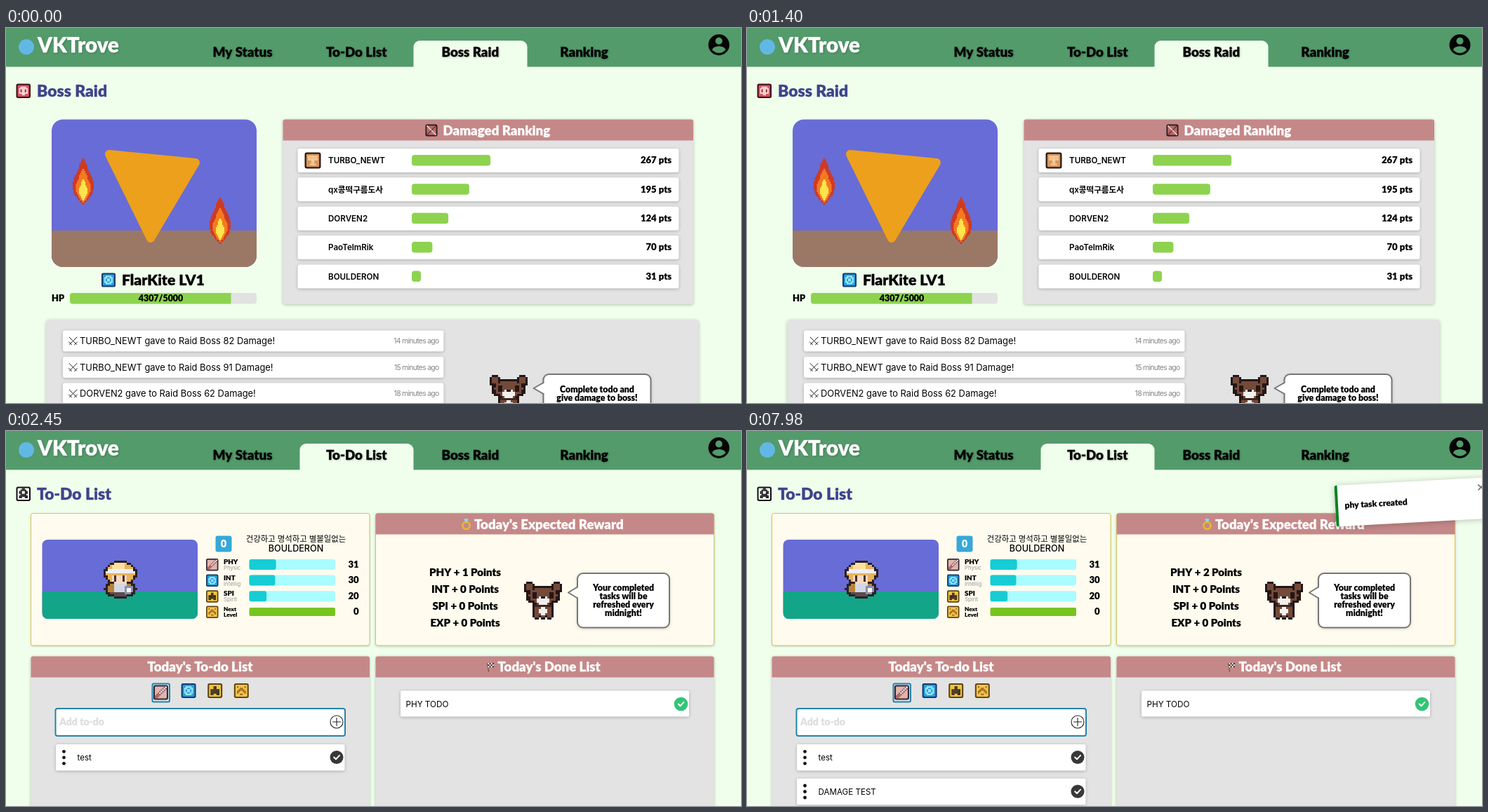
An HTML page with a canvas that plays this animation: 1047 by 535 pixels, repeating every 8 s.

```html
<!DOCTYPE html>
<html lang="en">
<head>
<meta charset="utf-8">
<title>Quest board</title>
<style>
html, body { margin: 0; width: 100%; height: 100%; overflow: hidden; background: #f0ffec; }
canvas { display: block; width: 1047px; height: 535px; }
</style>
</head>
<body>
<canvas id="stage"></canvas>
<script>
const W = 1047, H = 535, LOOP = 8000, STEP = 70;
const canvas = document.getElementById('stage');
const ctx = canvas.getContext('2d');
const dpr = window.devicePixelRatio || 1;
canvas.width = W * dpr;
canvas.height = H * dpr;

const HEAD = '#539b6b', PAGE = '#f0ffec', ROSE = '#c58888', PANEL = '#e3e3e3';
const TITLE = '#3d448c', LIME = '#8dd34f', SKY = '#686cd6', FOCUS = '#2583a8';
const CREAM = '#fffcef', GOLD = '#d9c35c', DARK = '#241617';
const HERO_NAME = 'BOULDERON';

const HOVER = 1680, OPEN_TODO = 2030, UNHOVER = 2450, CARET_ON = 3640, CARET_OFF = 7210, SUBMIT = 7770;
// One key per time; '<' deletes
const KEYS = 'DAMAG<GE TEST';
const KEY_TIMES = [4200, 4410, 4550, 4690, 5040, 5460, 5530, 5670, 5880, 6230, 6300, 6510, 6650];

const { abs, hypot, sin, cos, PI } = Math;
const clamp = (v, a = 0, b = 1) => Math.min(b, Math.max(a, v));
const mix = (a, b, k) => a + (b - a) * k;

function typedText(t) {
  if (t >= SUBMIT) return '';
  return KEY_TIMES.filter(at => at <= t)
    .reduce((s, _, i) => KEYS[i] === '<' ? s.slice(0, -1) : s + KEYS[i], '');
}

function box(x, y, w, h, r, fill, shadow, border, bw = 1) {
  ctx.save();
  ctx.beginPath();
  ctx.roundRect(x, y, w, h, r);
  if (shadow) {
    ctx.shadowColor = 'rgba(0,0,0,.25)';
    ctx.shadowBlur = shadow * dpr;
    ctx.shadowOffsetY = dpr;
  }
  ctx.fillStyle = fill;
  ctx.fill();
  ctx.shadowColor = 'transparent';
  if (border) {
    ctx.strokeStyle = border;
    ctx.lineWidth = bw;
    ctx.stroke();
  }
  ctx.restore();
}

function disc(x, y, r, fill, stroke, lw = 1) {
  ctx.beginPath();
  ctx.arc(x, y, r, 0, PI * 2);
  if (fill) { ctx.fillStyle = fill; ctx.fill(); }
  if (stroke) { ctx.strokeStyle = stroke; ctx.lineWidth = lw; ctx.stroke(); }
}

function line(points, color, lw) {
  ctx.beginPath();
  points.forEach(([x, y]) => ctx.lineTo(x, y));
  ctx.strokeStyle = color;
  ctx.lineWidth = lw;
  ctx.lineCap = ctx.lineJoin = 'round';
  ctx.stroke();
}

// Heavy rounded display text
function loud(s, x, y, size, color = '#000', align = 'left', shadow = false) {
  ctx.save();
  ctx.font = `900 ${size}px Lato, sans-serif`;
  ctx.textAlign = align;
  ctx.fillStyle = ctx.strokeStyle = color;
  ctx.lineWidth = size * 0.015;
  ctx.lineJoin = 'round';
  ctx.strokeText(s, x, y);
  if (shadow) {
    ctx.shadowColor = 'rgba(0,0,0,.25)';
    ctx.shadowBlur = 3 * dpr;
    ctx.shadowOffsetX = ctx.shadowOffsetY = dpr;
  }
  ctx.fillText(s, x, y);
  ctx.restore();
}

function plain(s, x, y, size, color = '#000', align = 'left', weight = 400, spacing = 0) {
  ctx.font = `${weight} ${size}px Inter, "Noto Sans CJK KR", "Noto Sans CJK", sans-serif`;
  ctx.textAlign = align;
  ctx.fillStyle = color;
  ctx.letterSpacing = spacing + 'px';
  ctx.fillText(s, x, y);
  ctx.letterSpacing = '0px';
}

// Pixel art from a rule: colorAt(u, v) with u and v counted from the middle
function pixels(x, y, cell, n, colorAt) {
  const mid = (n - 1) / 2;
  for (let j = 0; j < n; j++) {
    for (let i = 0; i < n; i++) {
      const color = colorAt(i - mid, j - mid);
      if (!color) continue;
      ctx.fillStyle = color;
      ctx.fillRect(x + i * cell, y + j * cell, cell, cell);
    }
  }
}

// kind: [edge, fill, glyph rule on an 8 by 8 grid]
const ICONS = {
  phy: ['#352636', '#e2b5aa', (u, v) => abs(u + v) < 1 ? (u > -1 ? '#f8f6fa' : '#c4544c') : abs(u + v) < 2 && '#8c5a66'],
  int: ['#153c6c', '#279ddc', (u, v) => (abs(hypot(u, v) - 2.7) < 0.6 || hypot(u, v) < 1) && '#a5effc'],
  spi: ['#5c430f', '#f1c443', (u, v) => (hypot(u, v + 2) < 1.4 || abs(u) < 3 && abs(v - 0.5) < 1.1
    || v > 1 && v < 3 && abs(abs(u) - 2) < 1) && '#28221c'],
  exp: ['#654711', '#f3c44e', (u, v) => abs(u) < 3 && abs(v) < 3 && (v - abs(u) + 10) % 4 < 2 && '#9c6418'],
  skull: ['#381019', '#d9535e', (u, v) => hypot(u, v + 0.3) < 3.1
    && (abs(abs(u) - 1.5) < 0.6 && abs(v) < 1 ? '#8c2f3a' : '#ffe9e4')],
  hit: ['#201a1e', '#b8686a', (u, v) => abs(u - v) < 1 ? '#f5eeee' : abs(u + v) < 1 && '#58282c'],
  cup: ['#2c1912', '#d8965f', (u, v) => abs(v) < 3 && abs(u) < (v < 0 ? 3 : v < 2 ? 1 : 2) && '#f6cb95'],
  medal: ['#111', '#fff', (u, v) => (abs(hypot(u, v + 1) - 2) < 0.7 || v > 1 && v < 3 && abs(abs(u) - 2) < 1) && '#111'],
};

function icon(kind, x, y, size) {
  const [edge, fill, glyph] = ICONS[kind];
  const c = size / 10;
  box(x, y, size, size, c * 1.3, edge);
  box(x + c, y + c, size - 2 * c, size - 2 * c, c * 0.5, fill);
  pixels(x + c, y + c, c, 8, glyph);
}

function bear(x, y) {
  pixels(x, y, 3, 18, (u, v) => {
    u = abs(u);
    const ear = hypot(u - 6.5, v + 6.3) - 2.7, head = hypot(u * 0.6, v + 2.5) - 5;
    const body = hypot(u * 0.9, v - 4) - 4.6, foot = hypot(u - 3, v - 7.2) - 1.9;
    const depth = Math.min(ear, head, body, foot);
    if (depth > 0) return null;
    if (depth > -1) return DARK;
    if (hypot(u - 4, v + 2.5) < 1.3 || u < 1 && v === -1.5) return DARK;
    if (hypot(u * 0.7, v) < 2 || hypot(u, v - 5) < 2) return '#f2f0ec';
    return abs(v - 2.5) < 0.6 ? '#3c2620' : '#744a39';
  });
}

function hero(x, y) {
  pixels(x, y, 3, 18, (u, v) => {
    const head = hypot(u * 0.75, v + 3) - 6, body = hypot(u * 0.6, v - 4.5) - 4.5;
    const depth = Math.min(head, body);
    if (depth > 0) return null;
    if (depth > -1) return '#2a2024';
    if (hypot(u - 4, v - 5) < 2.4) return hypot(u - 4, v - 5) < 1.5 ? '#f5f6fb' : '#8a92a8';
    if (v > 2) return v > 6 ? '#5c4a4c' : abs(u) < 3 ? '#d4d8e4' : '#b98338';
    if (v > -2 && abs(u + 0.5) < 4) return abs(abs(u + 0.5) - 2) < 0.6 && v < 1 ? '#4b2d2a' : '#f8dac0';
    if (abs(v + 4) < 1) return '#eceef6';
    return v < -5 && abs(u + 1) < 3 ? '#ffdf9c' : '#e9b25c';
  });
}

// Three nested tapered layers: rim, flame, core
function flame(cx, top) {
  ['#cf3a22', '#f37a20', '#ffe44c'].forEach((color, k) => {
    const rows = 23 - 6 * k, width = 15 - 4.5 * k;
    ctx.fillStyle = color;
    for (let row = 0; row < rows; row++) {
      const v = (row + 0.5) / rows;
      const half = Math.round(width * sin(PI * v ** 1.4) ** 0.9 / 1.5) * 1.5;
      ctx.fillRect(cx - half, top + (22 - k - rows + 1 + row) * 3, half * 2, 3);
    }
  });
}

function scene(x, y, w, h, r, horizon, ground) {
  box(x, y, w, h, r, SKY);
  ctx.save();
  ctx.beginPath();
  ctx.roundRect(x, y, w, h, r);
  ctx.clip();
  ctx.fillStyle = ground;
  ctx.fillRect(x, horizon, w, h);
  ctx.restore();
}

function boss(t) {
  const tick = Math.floor(t / STEP) * STEP;
  const spread = (1 + cos(tick / 350 * PI * 2)) / 2;
  ctx.beginPath();
  ctx.moveTo(147, 180);
  ctx.lineTo(mix(255, 270, spread), 192);
  ctx.lineTo(mix(199, 206, spread), mix(306, 300, spread));
  ctx.closePath();
  ctx.fillStyle = ctx.strokeStyle = '#eda01c';
  ctx.lineWidth = 12;
  ctx.lineJoin = 'round';
  ctx.fill();
  ctx.stroke();
}

function bubble(x, y, w, h, tailX, tailY, lines, textX, textY) {
  box(x, y, w, h, 8, '#fff', 5, '#777', 2);
  const tail = [[x, tailY - 8], [tailX, tailY], [x, tailY + 8]];
  ctx.beginPath();
  tail.forEach(([a, b]) => ctx.lineTo(a + 2, b));
  ctx.fillStyle = '#fff';
  ctx.fill();
  line(tail, '#777', 2);
  lines.forEach((s, i) => loud(s, textX, textY + i * 12, 12.3, '#000', 'center'));
}

function titledPanel(x, y, w, h, fill, border) {
  box(x, y, w, h, 3, fill, 4, border);
  box(x, y, w, 30, [3, 3, 0, 0], ROSE);
}

function pageTitle(kind, s) {
  icon(kind, 14.5, 79.5, 20.5);
  loud(s, 44, 98, 22.9, TITLE);
}

function header(t, active) {
  ctx.fillStyle = HEAD;
  ctx.fillRect(0, 0, W, 55.4);
  disc(29, 27, 11, '#62b8e4');
  loud('VKTrove', 45, 35, 29.5, '#fff', 'left', true);
  box(418.5 + (active - 1) * 162, 18, 162, 38, [9, 9, 0, 0], PAGE);
  const hover = t < UNHOVER ? clamp((t - HOVER) / 210) : 0;
  ['My Status', 'To-Do List', 'Boss Raid', 'Ranking'].forEach((s, i) => {
    const color = i === 1 ? `rgb(${24 * hover},${62 * hover},${142 * hover})` : '#000';
    loud(s, 337 + i * 162.2, 41, 18.7, color, 'center', true);
  });
  disc(1015.5, 24, 15, '#050505');
  disc(1015.5, 18.5, 5, HEAD);
  ctx.beginPath();
  ctx.ellipse(1015.5, 31.5, 9.5, 5.5, 0, PI, 0);
  ctx.quadraticCurveTo(1015.5, 40, 1006, 31.5);
  ctx.fill();
}

function rankRow(y, name, points) {
  box(415.5, y, 543, 34, 3, '#fff', 4);
  plain(name, 459, y + 21.3, 11.6, '#000', 'left', 600);
  box(578, y + 9, points * 0.42, 15.5, 4, LIME);
  loud(points + ' pts', 948, y + 21.3, 13.1, '#000', 'right');
}

function logRow(y, name, damage, age) {
  box(81, y, 542.5, 30, 3, '#fff', 4);
  for (const d of [-1, 1]) {
    line([[95.5 - 5.5 * d, y + 9.5], [95.5 + 5 * d, y + 20]], '#222', 1);
    line([[95.5 + 2 * d, y + 20.5], [95.5 + 6 * d, y + 16.5]], '#222', 1);
  }
  plain(`${name} gave to Raid Boss ${damage} Damage!`, 105, y + 19.7, 12.9);
  plain(`${age} minutes ago`, 616.5, y + 18.8, 10.4, '#858585', 'right', 400, -0.7);
}

function raidPage(t) {
  pageTitle('skull', 'Boss Raid');
  scene(65, 130.5, 292, 210.5, 16, 289, '#9b7866');
  flame(110, 183);
  flame(305, 239);
  boss(t);

  icon('int', 136, 349.5, 20);
  loud('FlarKite LV1', 165, 367, 21.2);
  loud('HP', 65, 390, 12.8);
  box(91, 378, 266, 15.5, 4, '#e2e2e2');
  box(91, 378, 229.5, 15.5, [4, 0, 0, 4], LIME);
  loud('4307/5000', 220.5, 390, 12.4, '#000', 'center');

  titledPanel(394.5, 130.5, 584.5, 263.5, PANEL);
  icon('hit', 597.5, 137.5, 17);
  loud('Damaged Ranking', 622.5, 152.5, 18.7, '#fff');
  [['TURBO_NEWT', 267], ['qx콩떡구름도사', 195], ['DORVEN2', 124], ['PaoTelmRik', 70], [HERO_NAME, 31]]
    .forEach(([name, points], i) => rankRow(172 + i * 41.35, name, points));
  icon('cup', 425.5, 177.5, 23);

  box(57.5, 416.5, 929, 140, 4, PANEL, 5);
  [['TURBO_NEWT', 82, 14], ['TURBO_NEWT', 91, 15], ['DORVEN2', 62, 18]]
    .forEach((entry, i) => logRow(431.5 + i * 37.5, ...entry));
  bear(689, 495);
  bubble(765.5, 494, 153, 80, 751.5, 514, ['Complete todo and', 'give damage to boss!'], 842, 520);
}

function check(x, y, r, fill) {
  disc(x, y, r, fill);
  line([[x - 3.8, y], [x - 1, y + 2.8], [x + 4, y - 2.6]], '#fff', 2);
}

function task(y, name) {
  box(71, y, 411.5, 37.5, 2, '#fff', 4);
  for (let i = -1; i <= 1; i++) disc(82.5, y + 18.8 + i * 8.5, 2.4, '#111');
  plain(name, 101.5, y + 23, 11.6);
  check(471, y + 18.5, 9.5, '#383838');
}

function ring() {
  disc(655.5, 135, 5, null, '#e6b92e', 2.6);
  line([[654, 126.5], [657, 126.5], [655.5, 128.5], [654, 126.5]], '#8fd6ee', 3);
}

function flag() {
  line([[685.5, 331.5], [687.5, 343]], '#6b4a38', 1.2);
  pixels(686.5, 331, 2.1, 4, (u, v) => v < 1 && ((u + v) % 2 ? '#eee' : '#333'));
}

function statRow(i, kind, label, sub, value) {
  const y = 183 + i * 22.6;
  icon(kind, 285, y - 1, 17.5);
  loud(label, 310, y + 7.2, 9.8);
  plain(sub, 310, y + 15, 7.8, '#999');
  box(346.5, y, 122.5, 15, 3, '#a9fcff');
  box(346.5, y, value * 1.23, 15, 3, '#17ccd5');
  loud(value, 502.5, y + 11.8, 13, '#000', 'right');
}

function statusCard() {
  box(35.5, 117.5, 482.5, 188.5, 3, CREAM, 3, GOLD);
  scene(51.5, 155, 221.5, 113, 8, 229, '#12a588');
  hero(136, 185);
  box(298.5, 149.5, 23, 23, 3, '#36a8d8');
  loud('0', 310, 166, 14, '#fff', 'center');
  plain('건강하고 명석하고 별볼일없는', 413, 158, 11.4, '#000', 'center', 500);
  plain(HERO_NAME, 413, 171.5, 12.6, '#000', 'center', 500);
  statRow(0, 'phy', 'PHY', 'Physic', 31);
  statRow(1, 'int', 'INT', 'Intellig', 30);
  statRow(2, 'spi', 'SPI', 'Spirit', 20);
  icon('exp', 285, 249.5, 17.5);
  loud('Next', 310, 257, 8.2);
  loud('Level', 310, 264.5, 8.2);
  box(346.5, 252, 122.5, 12, 2, '#77c421');
  loud('0', 502.5, 262.3, 13, '#000', 'right');
}

function rewardCard(phy) {
  titledPanel(526.5, 117.5, 482, 188.5, CREAM, GOLD);
  ring();
  loud("Today's Expected Reward", 667, 139.5, 18.6, '#fff');
  ['PHY', 'INT', 'SPI', 'EXP'].forEach((name, i) =>
    loud(`${name} + ${i ? 0 : phy} Points`, 654, 206.7 + i * 24, 15, '#000', 'center'));
  bear(738, 215);
  bubble(814, 203, 131, 77.5, 801, 230.5,
    ['Your completed', 'tasks will be', 'refreshed every', 'midnight!'], 879.5, 228);
}

function field(t) {
  box(70.5, 396, 412.5, 39, 3, '#fff', 0, FOCUS, 2);
  const typed = typedText(t);
  if (typed) loud(typed, 75, 419.8, 13.4);
  else loud('Add to-do', 76, 419.8, 14, '#dedede');
  if (t >= CARET_ON && t < CARET_OFF) {
    ctx.font = '900 13.4px Lato, sans-serif';
    ctx.fillStyle = '#000';
    ctx.fillRect(Math.round(75 + ctx.measureText(typed).width), 406.5, 1, 16.5);
  }
  disc(471, 415, 9, null, '#222', 1.1);
  line([[465.5, 415], [476.5, 415]], '#222', 1.1);
  line([[471, 409.5], [471, 420.5]], '#222', 1.1);
}

function toast(t) {
  const k = clamp((t - SUBMIT) / 210);
  ctx.save();
  ctx.translate(mix(1060, 836.5, sin(k * PI / 2)), 78);
  ctx.rotate(-3.1 * PI / 180);
  box(0, 0, 300, 58.5, 3, '#fff', 9);
  box(0, 0, 4, 58.5, [3, 0, 0, 3], '#0b8220');
  loud('phy task created', 13.5, 33, 12);
  for (const d of [-1, 1]) line([[205, 13.5 - 3.5 * d], [212, 13.5 + 3.5 * d]], '#777', 1.6);
  ctx.restore();
}

function todoPage(t) {
  const done = t >= SUBMIT;
  pageTitle('medal', 'To-Do List');
  statusCard();
  rewardCard(done ? 2 : 1);

  titledPanel(35.5, 321.5, 482.5, 230, PANEL);
  titledPanel(526.5, 321.5, 482, 230, PANEL);
  loud("Today's To-do List", 276.5, 343, 18.7, '#fff', 'center');
  flag();
  loud("Today's Done List", 700.5, 343, 18.6, '#fff');

  box(208.5, 360.5, 24.5, 26, 2, '#d3e7ee', 0, FOCUS, 2);
  icon('phy', 210, 362.5, 21);
  ['int', 'spi', 'exp'].forEach((kind, i) => icon(kind, 249.6 + i * 37.6, 360, 21));
  field(t);
  task(447, 'test');
  if (done) task(495.7, 'DAMAGE TEST');

  box(562, 370.5, 411, 37, 2, '#fff', 4);
  plain('PHY TODO', 569.5, 393.5, 11.7);
  check(961.5, 389.5, 9.8, '#32c477');
  if (done) toast(t);
}

function draw() {
  const t = performance.now() % LOOP;
  const raid = t < OPEN_TODO;
  ctx.setTransform(dpr, 0, 0, dpr, 0, 0);
  ctx.fillStyle = PAGE;
  ctx.fillRect(0, 0, W, H);
  header(t, raid ? 2 : 1);
  (raid ? raidPage : todoPage)(t);
  requestAnimationFrame(draw);
}
draw();
</script>
</body>
</html>
```
